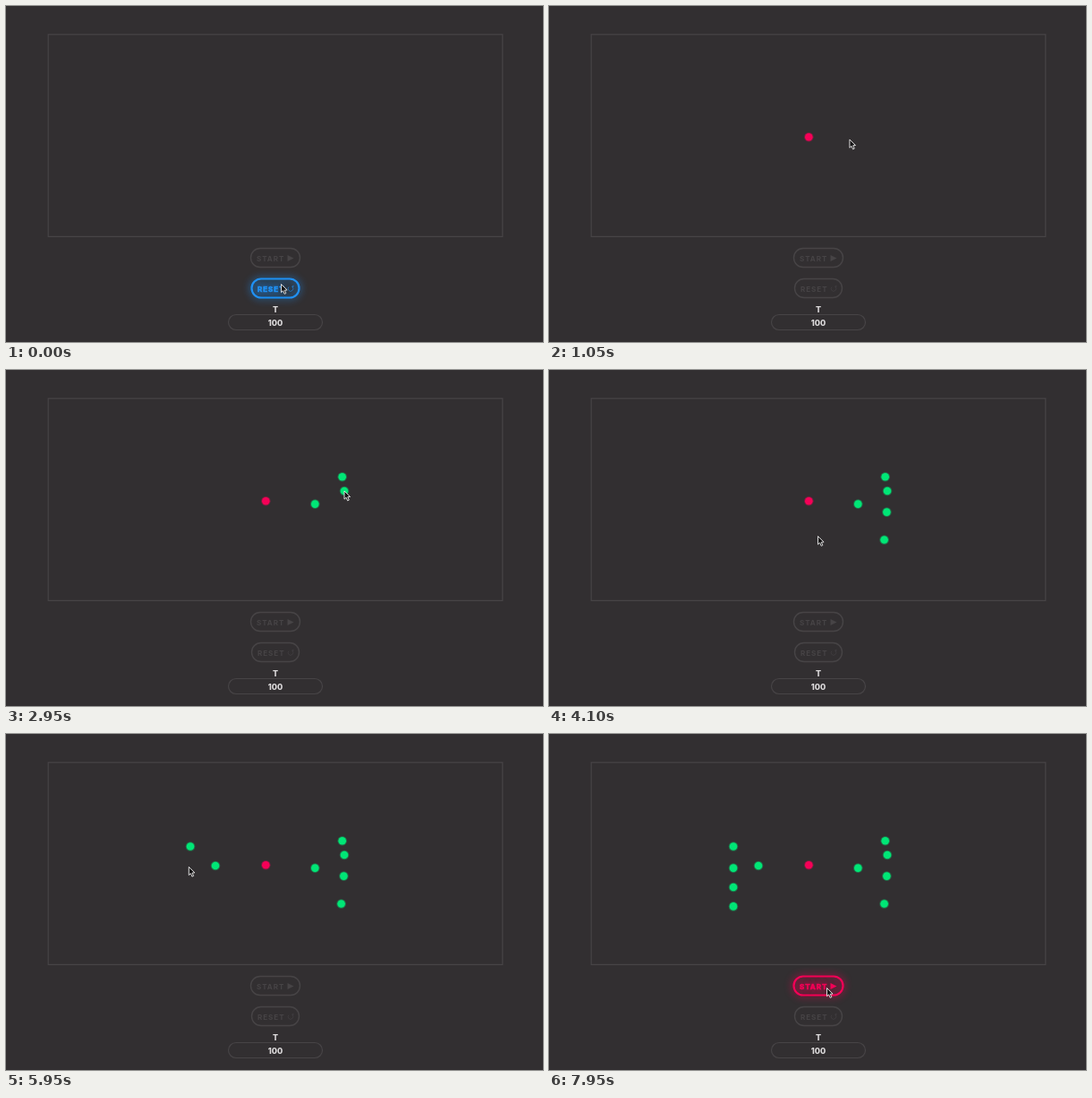
Write an HTML page with a canvas that moves like this. It is 600 px wide and 375 px high and loops after 8000 ms.

```html
<!DOCTYPE html>
<html lang="en">
<head>
<meta charset="utf-8">
<title>Dot board</title>
<style>
  html, body { margin: 0; width: 100%; height: 100%; overflow: hidden; background: #322f31; }
  canvas { display: block; width: 600px; height: 375px; }
</style>
</head>
<body>
<canvas id="stage"></canvas>
<script>
const LOOP = 8000, STEP = 50;
const BG = '#322f31', LINE = '#474446', TEXT = '#dedcdd';
const GREY = [71, 68, 70], BLUE = [33, 146, 245], TEAL = [47, 91, 99];
const PINK = [245, 0, 87], GREEN = [0, 230, 118];

const canvas = document.getElementById('stage');
const ctx = canvas.getContext('2d');
const ratio = window.devicePixelRatio || 1;
canvas.width = 600 * ratio;
canvas.height = 375 * ratio;

// The pointer visits these stops in turn; a stop with a color leaves a dot.
const stop = (time, x, y, color) => ({ time, x, y, color });
const stops = [
  stop(0, 307.5, 310.5),
  stop(750, 290.3, 146.3, PINK),
  stop(1800, 345.3, 149.6, GREEN),
  stop(2400, 375.7, 119.2, GREEN),
  stop(2950, 378, 135, GREEN),
  stop(3450, 377.4, 158.6, GREEN),
  stop(3700, 374.6, 189.5, GREEN),
  stop(4100, 300.5, 185.5),
  stop(4900, 234, 147, GREEN),
  stop(5600, 206, 125.5, GREEN),
  stop(5950, 204.3, 148.3)
];
for (let i = 0; i < 3; i++) stops.push(stop(6100 + 375 * i, 206, 149.6 + 21.4 * i, GREEN));
stops.push(stop(7300, 272, 222), stop(7950, 310.5, 283.5));

const lerp = (a, b, k) => a + (b - a) * k;
const ramp = (t, a, b) => Math.max(0, Math.min(1, (t - a) / (b - a)));
const easeOut = k => 1 - (1 - k) ** 4;
const mix = (a, b, k) => a.map((v, i) => lerp(v, b[i], k));
const rgb = (c, alpha = 1) => `rgba(${c.map(Math.round).join(',')},${alpha})`;

// Each trip takes the first 80% of the time between two stops.
function pointerAt(t) {
  const i = stops.findIndex(s => s.time > t);
  if (i < 0) return stops[stops.length - 1];
  const a = stops[i - 1], b = stops[i];
  const k = easeOut(ramp(t, a.time, lerp(a.time, b.time, 0.8)));
  return { x: lerp(a.x, b.x, k), y: lerp(a.y, b.y, k) };
}

function pill(x, y, w, h, color, width) {
  ctx.beginPath();
  ctx.roundRect(x, y, w, h, h / 2);
  ctx.strokeStyle = color;
  ctx.lineWidth = width;
  ctx.stroke();
}

function label(text, x, y, size, color, weight = 700, spacing = 0, align = 'center') {
  ctx.font = `${weight} ${size}px Inter, "Liberation Sans", sans-serif`;
  ctx.letterSpacing = spacing + 'px';
  ctx.textAlign = align;
  ctx.fillStyle = color;
  ctx.fillText(text, x, y);
}

function playIcon(x, y) {
  ctx.beginPath();
  ctx.moveTo(x - 3.5, y - 3.5);
  ctx.lineTo(x + 3.5, y);
  ctx.lineTo(x - 3.5, y + 3.5);
  ctx.fill();
}

function resetIcon(x, y) {
  ctx.globalAlpha = 0.65;
  ctx.lineWidth = 0.9;
  ctx.beginPath();
  ctx.arc(x, y, 2.8, -0.7, Math.PI * 1.25);
  ctx.stroke();
  ctx.beginPath();
  ctx.moveTo(x + 0.6, y - 2.2);
  ctx.lineTo(x + 3.2, y - 1.4);
  ctx.lineTo(x + 3.5, y - 4);
  ctx.fill();
}

function button(text, y, width, icon, color, level) {
  const left = 301 - width / 2;
  ctx.save();
  ctx.shadowColor = color;
  ctx.shadowBlur = 9 * level * ratio;
  pill(left, y - 10.5, width, 21, color, 1.4 + 0.8 * level);
  label(text, left + 6.5, y + 3.5, 8, color, 700, 1, 'left');
  if (level > 0) {
    ctx.lineWidth = 0.6 * level;
    ctx.strokeText(text, left + 6.5, y + 3.5);
  }
  icon(318, y + 0.5);
  ctx.restore();
}

function disc(x, y, r, fill) {
  ctx.beginPath();
  ctx.arc(x, y, r, 0, Math.PI * 2);
  ctx.fillStyle = fill;
  ctx.fill();
}

function dot({ x, y, color }) {
  disc(x, y, 5.3, rgb(color, 0.35));
  disc(x, y, 4.3, rgb(color));
}

function pointer({ x, y }) {
  ctx.save();
  ctx.translate(x, y);
  ctx.beginPath();
  ctx.moveTo(0, 0);
  for (const [px, py] of [[0, 9.2], [2.1, 7.3], [3.6, 10.8], [5.3, 10.1], [3.8, 6.7], [6.6, 6.5]])
    ctx.lineTo(px, py);
  ctx.closePath();
  ctx.lineJoin = 'round';
  ctx.fillStyle = '#151415';
  ctx.fill();
  ctx.strokeStyle = '#eeeeee';
  ctx.lineWidth = 0.9;
  ctx.stroke();
  ctx.restore();
}

function draw(t) {
  ctx.setTransform(ratio, 0, 0, ratio, 0, 0);
  ctx.fillStyle = BG;
  ctx.fillRect(0, 0, 600, 375);
  ctx.strokeStyle = LINE;
  ctx.lineWidth = 1.2;
  ctx.strokeRect(47.2, 31.8, 507.6, 225.6);

  const startOn = ramp(t, 7600, 7850);
  button('START', 281, 55, playIcon, rgb(mix(GREY, PINK, startOn)), startOn);

  const resetOn = 1 - ramp(t, 50, 300);
  const faded = mix(TEAL, GREY, ramp(t, 300, 600));
  button('RESET', 315, 53, resetIcon, rgb(mix(faded, BLUE, resetOn)), resetOn);

  label('T', 301, 342.4, 9, TEXT, 800);
  pill(248.5, 344.5, 105, 17, LINE, 1.2);
  label('100', 301, 356.7, 9, TEXT, 800);

  stops.filter(s => s.color && t >= s.time).forEach(dot);
  pointer(pointerAt(t));
}

function frame(now) {
  draw(Math.floor((now % LOOP) / STEP) * STEP);
  requestAnimationFrame(frame);
}
draw(0);
requestAnimationFrame(frame);
</script>
</body>
</html>
```
